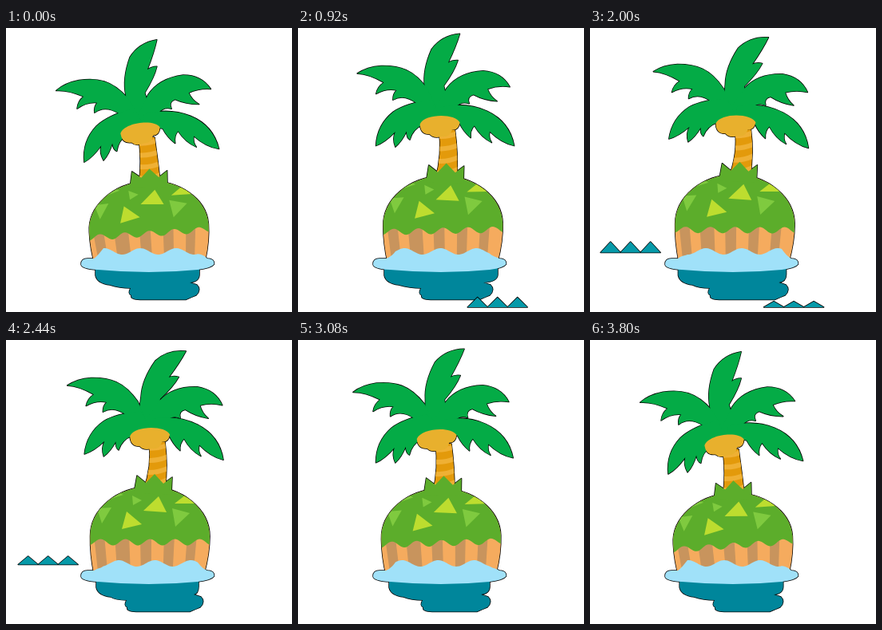
Animation of 358x356 px, one loop 3.84 s. Source, as an HTML page with a canvas:

```html
<!DOCTYPE html>
<html lang="en">
<head>
<meta charset="utf-8">
<title>Island</title>
<style>
  html, body { margin: 0; height: 100%; overflow: hidden; background: #fff; }
  canvas { display: block; }
</style>
</head>
<body>
<canvas id="stage" width="358" height="356"></canvas>
<script>
const ctx = document.getElementById('stage').getContext('2d');
const LOOP = 3840, STEP = 40;
const CROWN = { x: 183, y: 111 };

// Values of every moving property at the key times; a periodic spline joins them.
const times = [0, 520, 920, 1560, 2440, 3080];
const keys = {
  crownX: [167, 172, 177.5, 183, 180, 173],
  crownY: [121, 117, 112, 111, 112, 114],
  top: [-9.7, -7.4, -5.4, 0, 6, -1.2],
  left: [-7.8, -5.7, -1.1, 0, -1.1, -4.6],
  lowLeft: [-14.5, -10, -6, 0, -2.8, -9],
  right: [-7.6, -6.4, -3.4, 0, 1.8, -2.2],
  lowRight: [-5.2, -4.1, -2.1, 0, -0.4, -3.2],
  islandX: [-1, -0.5, 0, 0, -2, -2],
  islandY: [3, 2, 0.5, 0, 0, 0.8],
  islandTilt: [-4, -2.2, -1.2, 0, 0, -1.8],
  islandScale: [0.95, 0.97, 0.99, 1, 1, 0.985],
  poolLeft: [112, 109, 108, 108, 113, 114],
  poolRight: [242, 248, 250, 250, 241, 240],
  tailLeft: [154, 155, 152, 148, 149, 154],
  tailRight: [243, 244, 245, 249, 248, 242],
};

const fronds = {
  top: 'M166 112L167 71Q166 50 180 25Q194 9 217 9Q211 24 199 44Q204 41 211.500 42Q206 55 191 72L196 112Z',
  left: 'M168 76C151 50 133 45 110 45Q92 46 80 54Q95 55 113 66Q105 71 103 80Q116 73 129 76Q124 80 124 88Q138 80 154 93L184 114Z',
  lowLeft: 'M172 88Q142 89 125 98Q103 112 99 138Q111 135 125 123Q120 131 123 142Q132 136 139 124Q138 132 142 135Q147 122 160 118L184 112Z',
  right: 'M193 75Q209 56 240 56Q263 59 272 78Q258 75 244 79Q247 89 255 95Q239 93 226 85Q217 87 220 96Q211 92 203 99L188 112L176 100Z',
  lowRight: 'M184 98C225 91 268 108 274 150Q258 146 244 131Q242 139 246 145Q233 138 225 123Q219 129 220 138Q211 130 206 118L184 113Z',
};
for (const name in fronds) fronds[name] = new Path2D(fronds[name]);

const coconuts = new Path2D('M158 119C164 106 202 106 208 118Q206 128 198 127Q195 137 185 135Q175 138 170 132Q158 132 158 119Z');
const dome = new Path2D('M112 293Q107 268 107.500 246C107.500 212 141 184 182 184C223 184 257 212 257 246Q257 268 250 293Z');
const tuft = new Path2D('M162 192L166 170L177 179L188 168L199 180L210 172L209 194Z');
const brightSpots = new Path2D('M174 214L193 196L203 216ZM147 237L153 215L172 231ZM213 205L227 194L239 205Z');
const paleSpots = new Path2D('M210 211L232 217L214 234ZM116 211L134 210L122 230ZM160 195L172 201L161 207ZM121 203L136 188L149 194Z');
const grass = new Path2D('M90 170H270V252');
for (let x = 270; x >= 90; x -= 2) grass.lineTo(x, 253.5 + 4 * Math.cos((x - 136) * 2 * Math.PI / 31));
grass.closePath();

const stripes = new Path2D();
for (const [x, w] of [[112, 13], [138, 18], [170, 14], [200, 13], [229, 12]]) {
  const low = v => 181 + (v - 181) * 0.92;
  stripes.moveTo(x, 244);
  stripes.lineTo(x + w, 244);
  stripes.lineTo(low(x + w), 295);
  stripes.lineTo(low(x), 295);
  stripes.closePath();
}

function valueAt(v, t) {
  const n = times.length;
  const time = i => times[(i + n) % n] + LOOP * Math.floor(i / n);
  const value = i => v[(i + n) % n];
  const slope = i => (value(i + 1) - value(i - 1)) / (time(i + 1) - time(i - 1));
  let i = n - 1;
  while (times[i] > t) i--;
  const d = time(i + 1) - time(i), u = (t - time(i)) / d, r = 1 - u;
  return value(i) * r * r * (1 + 2 * u) + value(i + 1) * u * u * (3 - 2 * u)
    + d * u * r * (slope(i) * r - slope(i + 1) * u);
}

function placed(path, matrix) {
  const out = new Path2D();
  out.addPath(path, matrix);
  return out;
}

function reflection(p) {
  const { poolLeft: a, poolRight: b, tailLeft: c, tailRight: d } = p;
  return new Path2D(`M${a} 298V310Q${a + 2} 320 ${a + 18} 322Q${c - 12} 326 ${c + 2} 326
    Q${c - 2} 333 ${c + 3} 335Q${c + 1} 340 ${c + 14} 340.5H${d - 18}Q${d - 10} 337 ${d - 5} 335
    Q${d + 2} 328 ${d - 4} 322L${d - 13} 319Q${b} 318 ${b} 309V298Z`);
}

function surf(t) {
  const crest = 168 + 11 * (1 - Math.cos(t / LOOP * 2 * Math.PI));
  const path = new Path2D('M94 296Q94 289 102 289H110');
  for (let x = 110; x <= 252; x += 2) {
    const edge = Math.min(1, (x - 110) / 12, (252 - x) / 12);
    path.lineTo(x, 289 - edge * (9 + 4 * Math.cos((x - crest) * 2 * Math.PI / 45)));
  }
  path.addPath(new Path2D('M252 289Q261 289 260.500 296Q257 301 240 303Q180 309 115 303Q94 302 94 296L102 289Z'));
  return path;
}

function ripples(t, start, x, y, size, speed) {
  const u = (t - start) / 1760;
  const path = new Path2D();
  if (u <= 0 || u >= 1) return path;
  const h = size * Math.sin(Math.PI * u);
  for (let i = 0; i < 3; i++) {
    const left = x + speed * (t - start) + i * 25;
    path.moveTo(left, y);
    path.lineTo(left + 12.5, y - h);
    path.lineTo(left + 25, y);
    path.closePath();
  }
  return path;
}

function fill(path, color) {
  ctx.fillStyle = color;
  ctx.fill(path);
}

function outline(path) {
  ctx.strokeStyle = '#000';
  ctx.lineWidth = 1.5;
  ctx.stroke(path);
}

function within(path, paint) {
  ctx.save();
  ctx.clip(path);
  paint();
  ctx.restore();
}

function draw(t) {
  const p = {};
  for (const name in keys) p[name] = valueAt(keys[name], t);

  const land = new DOMMatrix().translate(181 + p.islandX, 282 + p.islandY)
    .rotate(p.islandTilt).scale(1, p.islandScale).translate(-181, -282);
  const onCrown = (angle, slide = 0) => new DOMMatrix().translate(p.crownX + slide, p.crownY)
    .rotate(angle).translate(-CROWN.x, -CROWN.y);
  const slide = -0.7 * p.left; // the leaves lag sideways behind the coconuts

  const base = land.transformPoint(new DOMPoint(187.5, 184));
  const x = p.crownX + 9, y = p.crownY + 16;
  const trunk = new Path2D(`M${x - 10} ${y}Q${x - 6} ${y + 30} ${base.x - 13.5} ${base.y + 4}
    H${base.x + 13.5}Q${x + 14} ${y + 28} ${x + 10} ${y}Z`);

  const pool = reflection(p), foam = surf(t);
  const hill = placed(dome, land), blades = placed(tuft, land);
  const leaves = Object.keys(fronds).map(name => placed(fronds[name], onCrown(p[name], slide)));
  const nuts = placed(coconuts, onCrown(p.left));

  ctx.fillStyle = '#fff';
  ctx.fillRect(0, 0, 358, 356);
  ctx.lineJoin = 'round';

  // Outlines lie below all fills, so only the silhouette keeps its dark edge.
  [pool, trunk, hill, blades, foam, ...leaves, nuts].forEach(outline);

  fill(pool, '#00869b');
  for (const wave of [ripples(t, 480, 210, 350, 17.5, 0.005), ripples(t, 1180, 9.5, 281.5, 13.5, 0.0045)]) {
    outline(wave);
    fill(wave, '#069aa9');
  }

  fill(trunk, '#e39a0b');
  within(trunk, () => {
    ctx.strokeStyle = '#efb034';
    ctx.lineWidth = 6;
    for (const u of [0.1, 0.37, 0.64, 0.9]) {
      const bx = x + (base.x - x) * u, by = y + (base.y - y) * u;
      ctx.beginPath();
      ctx.moveTo(bx - 18, by + 1);
      ctx.quadraticCurveTo(bx, by + 5, bx + 18, by - 4);
      ctx.stroke();
    }
  });

  fill(hill, '#f5ab5e');
  within(hill, () => {
    fill(placed(stripes, land), '#c8945d');
    fill(placed(grass, land), '#5cad2b');
    fill(placed(paleSpots, land), '#7fca3f');
    fill(placed(brightSpots, land), '#bddd2f');
  });
  fill(blades, '#5cad2b');
  fill(foam, '#a0e1f9');
  leaves.forEach(path => fill(path, '#04ab46'));
  fill(nuts, '#e8b02d');
}

function tick() {
  draw(Math.floor(performance.now() % LOOP / STEP) * STEP);
  requestAnimationFrame(tick);
}
tick();
</script>
</body>
</html>
```
